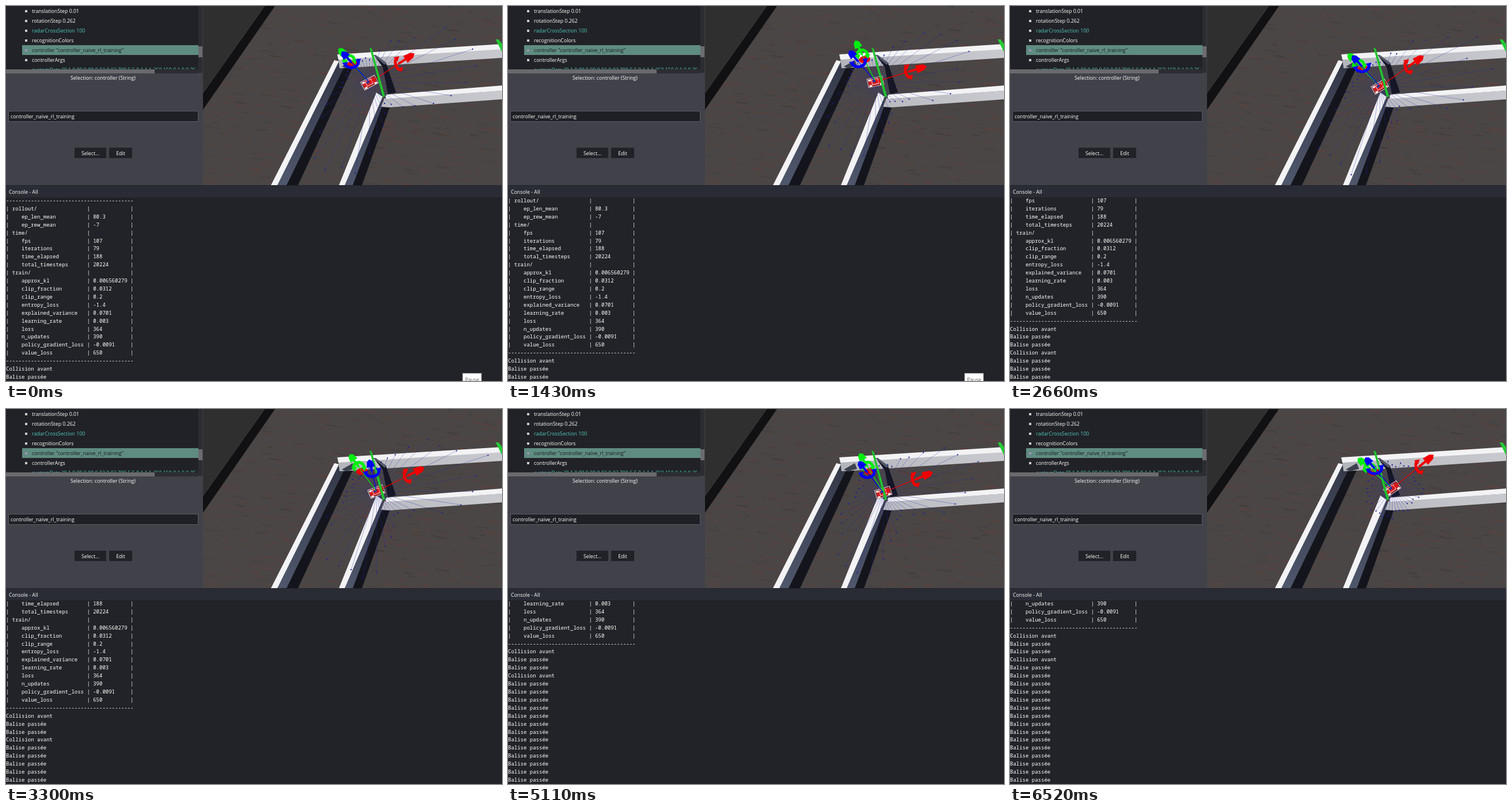
An HTML page with a canvas that plays this animation: 861 px wide and 651 px high, repeating every 6570 ms.

```html
<!DOCTYPE html>
<html lang="en">
<head>
<meta charset="utf-8">
<title>Simulator training console</title>
<style>
html, body { margin: 0; width: 100%; height: 100%; overflow: hidden; background: #212328; }
canvas { display: block; }
</style>
</head>
<body>
<canvas id="stage" width="861" height="651"></canvas>
<script>
const W = 861, H = 651, LOOP = 6570, STEP = 70;
const CRASH = 2080, RESTART = 2330;
const UI = '8.8px "Open Sans", "Noto Sans", sans-serif';
const MONO = '9px "Noto Sans Mono", "DejaVu Sans Mono", monospace';
const { PI, sin, cos, max, min, floor } = Math;
const rad = degrees => degrees * PI / 180;
const out = document.getElementById('stage').getContext('2d');
const backdrop = document.createElement('canvas');
backdrop.width = W;
backdrop.height = H;
let g = backdrop.getContext('2d');

function random(seed) {
  return () => {
    seed = (seed + 0x6D2B79F5) | 0;
    let v = Math.imul(seed ^ seed >>> 15, 1 | seed);
    v ^= v + Math.imul(v ^ v >>> 7, 61 | v);
    return ((v ^ v >>> 14) >>> 0) / 4294967296;
  };
}

function box(color, x, y, w, h) {
  g.fillStyle = color;
  g.fillRect(x, y, w, h);
}

function poly(fill, ...p) {
  g.beginPath();
  for (let i = 0; i < p.length; i += 2) g.lineTo(p[i], p[i + 1]);
  g.closePath();
  g.fillStyle = fill;
  g.fill();
}

function line(color, x1, y1, x2, y2, width = 1) {
  g.strokeStyle = color;
  g.lineWidth = width;
  g.beginPath();
  g.moveTo(x1, y1);
  g.lineTo(x2, y2);
  g.stroke();
}

function text(s, x, y, color = '#fff', font = UI, align = 'left') {
  g.font = font;
  g.textAlign = align;
  g.fillStyle = color;
  g.fillText(s, x, y);
}

function shade(x1, y1, x2, y2, from, to) {
  const s = g.createLinearGradient(x1, y1, x2, y2);
  s.addColorStop(0, from);
  s.addColorStop(1, to);
  return s;
}

function clipped(x, y, w, h, draw) {
  g.save();
  g.beginPath();
  g.rect(x, y, w, h);
  g.clip();
  draw();
  g.restore();
}

function ground() {
  box('#4a4645', 342, 0, 519, 311);
  const r = random(7);
  for (let i = 0; i < 800; i++) {
    const x = 335 + r() * 530, y = r() * 315, len = 6 + r() * 20;
    const tone = r() < .75 ? '118,58,58' : '56,50,50';
    line(`rgba(${tone},${.1 + r() * .3})`, x, y, x + len, y + len * .14, .8 + r() * 1.6);
  }
  poly('#111113', 342, 0, 467, 0, 342, 180);
  poly('#2f2f2f', 342, 0, 449, 0, 342, 151);
  line('#3c3c3c', 449, 0, 342, 151);
}

function walls() {
  const dark = '#14151c', white = '#f3f3f5';
  const side = shade(0, 100, 0, 311, '#343949', '#4f576c');
  const front = shade(575, 0, 861, 0, '#b4b5bb', '#c9cacf');
  poly(dark, 585, 105, 602, 106, 507, 311, 484, 311);
  poly(side, 577, 97, 587, 106, 487, 311, 470, 311);
  poly(white, 570, 94, 578, 96, 471, 311, 460, 311);
  poly(front, 577, 92, 861, 74, 861, 90, 600, 107, 579, 108);
  poly('#3d4250', 583, 105, 602, 94, 606, 104, 590, 108);
  poly(white, 575, 84, 861, 66, 861, 75, 577, 93);
  poly(dark, 639, 86, 660, 100, 677, 150, 663, 153, 654, 106);
  poly('#555a68', 637, 85, 642, 85, 661, 99, 657, 102);
  poly(dark, 648, 174, 666, 176, 618, 311, 600, 311);
  poly(side, 654, 157, 652, 177, 602, 311, 587, 311);
  poly(white, 643, 150, 654, 157, 588, 311, 578, 311);
  poly(front, 657, 160, 861, 147, 861, 162, 665, 176, 651, 175);
  poly(white, 658, 154, 861, 138, 861, 147, 660, 161);
  poly('#3d4250', 643, 150, 652, 148, 661, 153, 657, 160);
  poly('#22cc33', 850, 58, 855, 58, 861, 66, 861, 80);
}

function panel() {
  box('#404149', 0, 0, 342, 312);
  box('#212227', 0, 0, 334, 110);
  box('#2c2d33', 334, 0, 7, 116);
  box('#6b6c70', 334, 70, 7, 19);
  box('#5f8c81', 28, 68, 306, 17);
  const rows = ['translationStep 0.01', 'rotationStep 0.262', 'radarCrossSection 100', 'recognitionColors',
    'controller "controller_naive_rl_training"', 'controllerArgs'];
  rows.forEach((s, i) => {
    const y = 9 + i * 17;
    box(i === 4 ? '#9b93b4' : '#c9c9cb', 33, y - 2, 4, 4);
    text(s, 45, y + 3, i === 2 ? '#4fc9bc' : i === 4 ? '#15171b' : '#fff');
  });
  clipped(0, 100, 333, 10, () => text(
    'customData "0 1 0.00 0.00 0.02 0.02 700.5 5 0.1 1.1 250 150 0.1 0.0 35 300"', 45, 114, '#4fc9bc'));
  box('#2c2d33', 0, 110, 334, 7);
  box('#6a6a6d', 0, 110, 258, 7);
  text('Selection: controller (String)', 168.5, 128, '#fff', UI, 'center');
  box('#5a5b62', 4, 182, 330, 19);
  box('#1f2025', 5, 183, 328, 17);
  text('controller_naive_rl_training', 8, 195);
  for (const [label, x, w] of [['Select...', 119, 55], ['Edit', 179, 40]]) {
    box('#212227', x, 246, w, 18);
    text(label, x + w / 2, 258.5, '#fff', UI, 'center');
  }
  box('#212328', 0, 311, W, 340);
  box('#2a2c35', 0, 312, W, 20);
  text('Console - All', 5, 326);
}

clipped(342, 0, 519, 311, () => { ground(); walls(); });
panel();

const dashes = '-'.repeat(41);
const stats = `rollout/|ep_len_mean 80.3|ep_rew_mean -7|time/|fps 107|iterations 79|time_elapsed 188
total_timesteps 20224|train/|approx_kl 0.006560279|clip_fraction 0.0312|clip_range 0.2|entropy_loss -1.4
explained_variance 0.0701|learning_rate 0.003|loss 364|n_updates 390|policy_gradient_loss -0.0091|value_loss 650`
  .split(/[|\n]/).map(row => {
    const [name, value = ''] = row.split(' ');
    const label = (value ? '    ' : ' ') + name;
    return '|' + label.padEnd(25) + '| ' + value.padEnd(12) + '|';
  });
const log = [dashes, ...stats, dashes];
while (log.length < 40) log.push([21, 24].includes(log.length) ? 'Collision avant' : 'Balise passée');

// after the restart each beacon adds two lines
function scrolled(t) {
  if (t < RESTART) return (t >= 800) + (t >= 2010);
  return min(17, 7 + 2 * floor((t - 2850) / 550));
}

// two runs: a short one that ends in a crash, then a curve around the corner
function drive(t) {
  if (t < RESTART) {
    const u = min(1, t / CRASH);
    return { u, x: 631 + 10 * u, y: 133 - 2 * u, angle: -28 + 16 * sin(PI * u * .75) };
  }
  const u = (t - RESTART) / (LOOP - RESTART), bend = sin(PI * u);
  return { u, x: 642 + 22 * u * u, y: 138 + 8 * bend, angle: -35 + 20 * bend };
}

const lobe = (a, center) => max(0, cos(a - rad(center))) ** 4;

// rays reach far along both lanes and shorten near the end of a run
function rays({ u, x, y }, t) {
  const r = random(floor(t / STEP) + 11), count = 40, range = 1.2 * (1 - u ** 4);
  for (let i = 0; i < count; i++) {
    const a = i / count * 2 * PI;
    const len = (42 + range * (120 * lobe(a, -15) + 100 * lobe(a, 115))) * (.85 + r() * .3);
    const ex = x + cos(a) * len, ey = y + sin(a) * len;
    line('rgba(38,38,170,.45)', x, y, ex, ey, .8);
    box('#1c1c9a', ex - 1, ey - 1, 2, 2);
  }
}

function car({ x, y, angle }) {
  g.save();
  g.translate(x, y);
  g.rotate(rad(angle));
  box('#30262a', -13, -6, 28, 14);
  box('#d51e22', -12, -6, 24, 12);
  g.strokeStyle = '#f2c9cd';
  g.lineWidth = 1;
  g.strokeRect(-13.5, -7.5, 27, 15);
  g.strokeRect(-6, -5, 11, 9);
  for (const [wx, wy] of [[-12, -6], [-12, 4], [7, 4]]) box('#f4eeee', wx, wy, 5, 3);
  box('#2a35a0', -5, -3, 4, 3);
  g.restore();
}

// arrow at offset dx, dy from the car, with a curved rotation arrow on its shaft
function handle(color, { x, y }, dx, dy, size, rx, ry, tilt, from, to) {
  const cx = x + dx * .73, cy = y + dy * .73, tx = x + dx, ty = y + dy;
  line(color, x, y, tx, ty, 1.2);
  line(color, cx, cy, tx, ty, 4);
  g.lineWidth = 5;
  g.beginPath();
  g.ellipse(cx, cy, rx, ry, tilt, from, to);
  g.stroke();
  for (const a of [from, to]) {
    const ex = rx * cos(a), ey = ry * sin(a);
    const px = cx + ex * cos(tilt) - ey * sin(tilt);
    const py = cy + ex * sin(tilt) + ey * cos(tilt);
    poly(color, px - 5, py - 2, px + 5, py - 4, px + 2, py + 5);
  }
  g.save();
  g.translate(tx, ty);
  g.rotate(Math.atan2(dy, dx));
  poly(color, -size * .7, -7, size * .5, -5, size, 0, size * .5, 5, -size * .7, 7);
  g.restore();
}

function scene(t) {
  const pose = drive(t);
  const ahead = rad(pose.angle - 5), left = rad(pose.angle - 104);
  const gx = 72 * cos(left), gy = 72 * sin(left);
  const sway = -27 - 16 * cos(2 * PI * t / 1320);
  rays(pose, t);
  car(pose);
  g.fillStyle = '#e80000';
  g.beginPath();
  g.ellipse(pose.x + gx * .6, pose.y + gy * .6, 10, 6, -.15, 0, 7);
  g.fill();
  handle('#f00000', pose, 82 * cos(ahead), 82 * sin(ahead), 11, 5, 10, -.25, 1.4, 4.5);
  handle('#00ee10', pose, gx, gy, 8, 9, 8, 0, 2.7, 6.6);
  poly('#1fc42c', 631, 72, 635, 74, 658, 157, 654, 158);
  handle('#0000f0', pose, sway, -48, 8, 12, 9, 0, -.3, 2.8);
}

function consoleText(t) {
  const top = scrolled(t);
  for (let i = 0; i < 23; i++) text(log[top + i], 0, 341 + i * 13.91, '#fff', MONO);
}

function tooltip(t) {
  g.globalAlpha = max(0, min(1, (CRASH - t) / 280));
  box('#767676', 792, 637, 34, 14);
  box('#fff', 793, 638, 32, 13);
  text('Pause', 809, 652, '#55565c', UI, 'center');
  g.globalAlpha = 1;
}

function draw(t) {
  g = out;
  g.drawImage(backdrop, 0, 0);
  clipped(342, 0, 519, 311, () => scene(t));
  consoleText(t);
  tooltip(t);
}

const start = performance.now();
function tick() {
  draw((performance.now() - start) % LOOP);
  requestAnimationFrame(tick);
}
tick();
</script>
</body>
</html>
```
